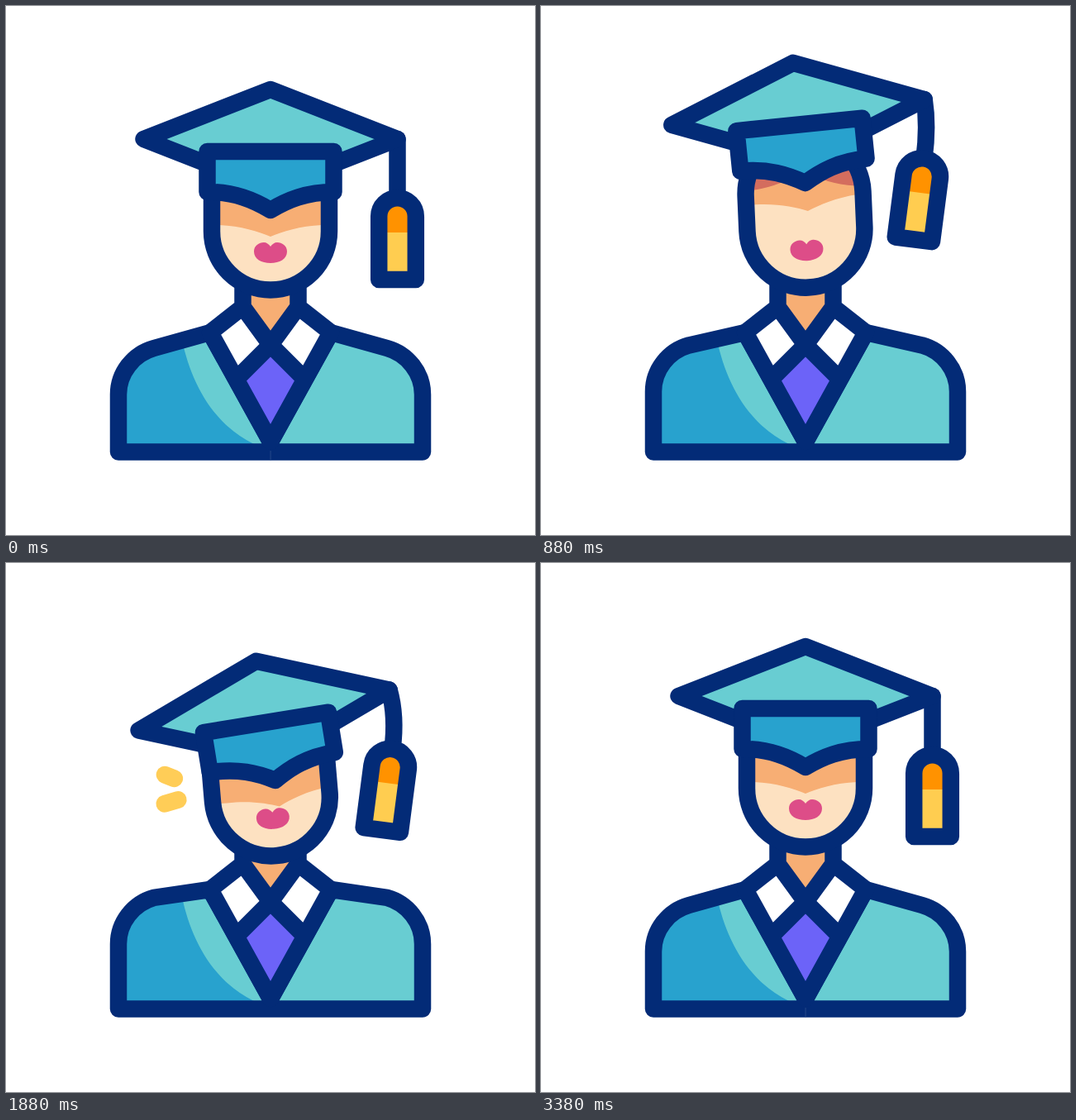
These frames come from a looping animation (640x640 px, 3600 ms). An HTML page:

```html
<!DOCTYPE html>
<html lang="en">
<head>
<meta charset="utf-8">
<title>Graduate</title>
<style>
  html, body { margin: 0; height: 100%; overflow: hidden; background: #fff; }
  svg { display: block; width: 100vw; height: 100vh; }
  .line { fill: none; stroke: #032b77; stroke-width: 20.5; stroke-linecap: round; stroke-linejoin: round; }
  .teal { fill: #68cdd2; }
  .blue { fill: #28a2ce; }
  .skin { fill: #f7ae74; }
  .spark { stroke: #ffcd57; stroke-width: 21; stroke-linecap: round; }
</style>
</head>
<body>
<svg viewBox="0 0 640 640">
  <defs>
    <clipPath id="faceClip"><rect id="mask" x="249" y="159" width="142" height="184.5" rx="71"/></clipPath>
    <clipPath id="bodyClip"><path id="bodyMask"/></clipPath>
  </defs>

  <line class="spark" id="spark1"/>
  <line class="spark" id="spark2"/>

  <path class="teal" id="bodyFill"/>
  <path class="blue" clip-path="url(#bodyClip)" d="M100 380H209C217 445 246 504 300 530V560H100Z"/>
  <path class="line" id="bodyLine"/>
  <path class="skin" d="M287 330V364L320 410L354 364V330Z"/>
  <path fill="#fff" d="M247 395L286 364L320 410L280 450ZM393 395L354 364L320 410L360 450Z"/>
  <path fill="#6c63f8" d="M320 410L360 450L320 526L280 450Z"/>
  <path class="line" d="M286.5 335V364L320 410L359 449M353.5 335V364L320 410L281 449M286.5 364L247 395L320 527L393 395L353.5 364"/>
  <rect id="seam" x="319.7" y="538" width=".7" height="12" fill="#33548f"/>

  <g clip-path="url(#faceClip)">
    <rect width="640" height="640" fill="#fde1c1"/>
    <path class="skin" id="shade" d="M-140 92L-90 98Q-76 103 -62 104C-36 105 -14 112 0 118C14 112 36 105 62 104Q76 103 90 98L140 92V-40H-140Z"/>
    <path id="hair" fill="#d46d5e" d="M240 226L258 223Q295 219 320 201Q345 219 382 223L400 226V140H240Z"/>
  </g>
  <g id="head">
    <path fill="#dd4d88" d="M300 297C300 290 306 286 312 286C315 286 318 288 320 291C322 288 325 286 328 286C334 286 340 290 340 297C340 306 331 311 320 311C309 311 300 306 300 297Z"/>
    <rect class="line" x="249" y="159" width="142" height="184.5" rx="71"/>
  </g>

  <path class="line" id="cord"/>
  <g id="tag">
    <path fill="#ffcd50" d="M-22 76.5V0A22 22 0 0 1 22 0V76.5Z"/>
    <path fill="#ff9200" d="M-22 19.5V0A22 22 0 0 1 22 0V19.5Z"/>
    <path class="line" d="M-22.3 76.5V0A22.3 22.3 0 0 1 22.3 0V76.5Z"/>
  </g>
  <g id="cap">
    <path class="line teal" style="fill:#68cdd2" d="M-153.5 0L0 -60L153.5 0L0 60Z"/>
    <path class="line blue" style="fill:#28a2ce" d="M-76.5 15H76.5V64C43 64 20 74 0 86C-20 74 -43 64 -76.5 64Z"/>
  </g>
</svg>
<script>
const LOOP = 3600, RAD = Math.PI / 180;
const $ = id => document.getElementById(id);
const set = (id, attrs) => { for (const k in attrs) $(id).setAttribute(k, attrs[k]); };
const clamp = x => Math.min(1, Math.max(0, x));

// Smooth curve through poses, level at every turning point.
function track(ts, ys) {
  const slope = ts.slice(1).map((t, i) => (ys[i + 1] - ys[i]) / (t - ts[i]));
  const tan = ts.map((_, i) => {
    const a = slope[i - 1] || 0, b = slope[i] || 0;
    return a * b > 0 ? 2 * a * b / (a + b) : 0;
  });
  return t => {
    const i = ts.findIndex(x => x > t) - 1;
    if (i < 0) return ys[ys.length - 1];
    const h = ts[i + 1] - ts[i], u = (t - ts[i]) / h, w = 1 - u;
    return ys[i] * (1 + 2 * u) * w * w + ys[i + 1] * u * u * (3 - 2 * u)
      + h * u * w * (tan[i] * w - tan[i + 1] * u);
  };
}

// Parts that share beats; each starts and ends at rest.
const beats = (...times) => (...poses) => track([0, ...times], [0, ...poses, 0]);

// crouch, leap, hang, land, rebound
const lift = beats(560, 1100, 1320, 1780, 2330, 2760);
const capY = lift(27, -66, -60.5, 20, -13.5);
const headY = lift(13.5, -12, -10, 12, 0);
const shrug = lift(-10, 0, 0, -10, 0);

// crouch, push off, lean back, land, rebound
const tilt = beats(600, 880, 1330, 1830, 2410, 2800);
const capR = tilt(-8.9, -5.8, 17.5, -9.5, 6);
const headR = tilt(-5, -2.5, 5, -5, 3.4);
const capX = tilt(-7.2, -9, 9, -8.2, 6);

// The tassel swings behind the cap.
const swing = beats(620, 880, 1140, 1320, 1880, 2170, 2430, 2740);
const tagR = swing(10, 7.4, -22, -12.8, 7.4, -13, 1.3);
const cordR = swing(7.5, 1.9, -13, -1.9, -.6, -8, 1.2);

function spark(id, t, x1, y1, x2, y2) {
  const lead = clamp((t - 1716) / 200), tail = clamp((t - 1811) / 200);
  const x = p => x1 + (x2 - x1) * p, y = p => y1 + (y2 - y1) * p;
  set(id, {
    x1: x(tail), y1: y(tail), x2: x(lead), y2: y(lead),
    visibility: lead > 0 && tail < 1 ? 'visible' : 'hidden'
  });
}

function draw(t) {
  const s = shrug(t);
  const body = `M136 539.5V${470 + s}C136 ${444 + s} 154 ${421 + s} 179 ${414 + s}L247 395L320 527L393 395`
    + `L461 ${414 + s}C486 ${421 + s} 504 ${444 + s} 504 ${470 + s}V539.5Z`;
  for (const id of ['bodyFill', 'bodyMask', 'bodyLine']) set(id, { d: body });
  set('seam', { opacity: clamp(1 + s / 2) });

  const head = `translate(0 ${headY(t)}) rotate(${headR(t)} 320 263)`;
  for (const id of ['head', 'hair', 'mask']) set(id, { transform: head });

  const rise = capY(t), x = 320 + capX(t), y = 161 + rise, r = capR(t);
  set('cap', { transform: `translate(${x} ${y}) rotate(${r})` });
  set('shade', { transform: `translate(${x} ${y + Math.max(0, -rise / 15)}) rotate(${r})` });

  const cx = x + 153.5 * Math.cos(r * RAD), cy = y + 153.5 * Math.sin(r * RAD);
  const cord = cordR(t) * RAD, tag = tagR(t);
  const ax = cx - 93.5 * Math.sin(cord), ay = cy + 93.5 * Math.cos(cord);
  const above = d => `${ax + d * Math.sin(tag * RAD)} ${ay - d * Math.cos(tag * RAD)}`;
  set('cord', { d: `M${cx} ${cy}Q${above(62)} ${above(22)}` });
  set('tag', { transform: `translate(${ax} ${ay}) rotate(${tag})` });

  spark('spark1', t, 212, 264, 188, 254.5);
  spark('spark2', t, 220, 283, 186, 293);
}

const start = performance.now();
function tick() {
  draw((performance.now() - start) % LOOP);
  requestAnimationFrame(tick);
}
tick();
</script>
</body>
</html>
```
